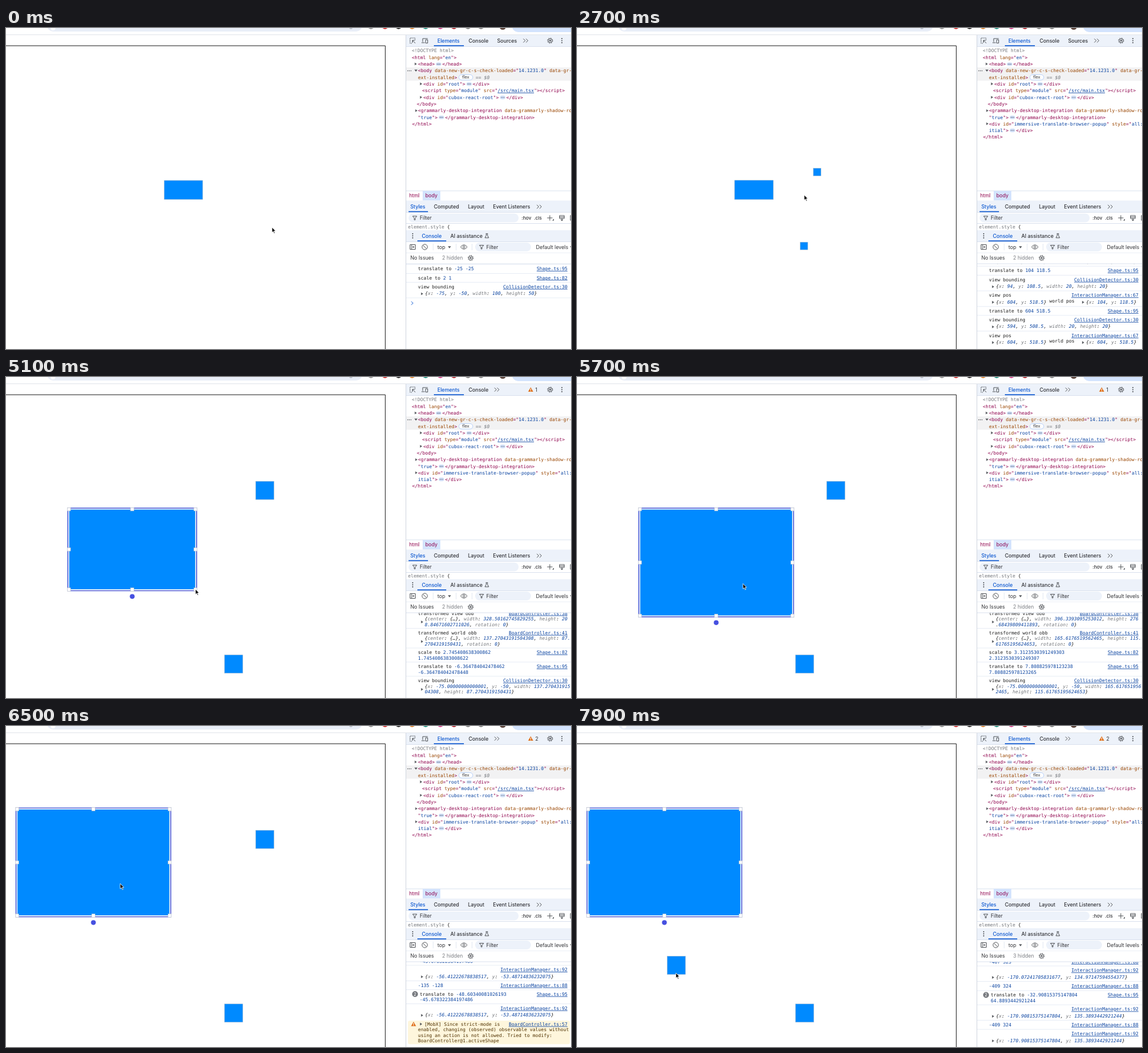
An HTML page that plays this animation: 960 px wide and 546 px high, repeating every 8000 ms.

```html
<!DOCTYPE html>
<html lang="en">
<head>
<meta charset="utf-8">
<title>Canvas board with inspector</title>
<style>
html, body { margin: 0; width: 100%; height: 100%; overflow: hidden; background: #fff; }
svg { display: block; width: 960px; height: 546px; }
text { white-space: pre; }
.u { font: 500 8.6px Inter, Roboto, sans-serif; fill: #303135; }
.r { font-weight: 400; }
.small { font-size: 8px; }
.on { fill: #0b57d0; }
.dim { fill: #7c7f84; }
.m { font: 7.9px "DejaVu Sans Mono", "Liberation Mono", monospace; fill: #1f1f1f; }
.o { font-style: italic; }
.tag { fill: #8e004b; }
.a { fill: #994500; }
.v, .n { fill: #0842a0; }
.l { fill: #0842a0; text-decoration: underline; }
.k { fill: #74777c; }
.w { fill: #4f3200; }
.i { fill: none; stroke: #474a4f; stroke-width: .95; }
.s { fill: #008aff; stroke: #9db6cf; stroke-width: .6; }
</style>
</head>
<body>
<svg id="stage" viewBox="0 0 960 546"></svg>
<script>
const LOOP = 8000, STEP = 100, CHAR = 4.757;
const UNIT = 53.48714836232075 / 128; // world length of one view pixel
const SCALE = [3.3123530391249303, 2.3123530391249307];
const PLACE = [7.808825978123238, 7.808825978123265];

// ---- drawing helpers ----
const esc = s => s.replace(/&/g, '&amp;').replace(/</g, '&lt;').replace(/>/g, '&gt;');
const rect = (x, y, w, h, fill, more = '') =>
  `<rect x="${x}" y="${y}" width="${w}" height="${h}" fill="${fill}" ${more}/>`;
const dot = (x, y, r, fill) => `<circle cx="${x}" cy="${y}" r="${r}" fill="${fill}"/>`;
const icon = (x, y, d, more = '') => `<path class="i" transform="translate(${x} ${y})" d="${d}" ${more}/>`;
const solid = (x, y, d, fill = '#55585d') => `<path transform="translate(${x} ${y})" d="${d}" fill="${fill}"/>`;
const ui = (x, y, s, cls = '') => `<text class="u ${cls}" x="${x}" y="${y + 3.1}">${esc(s)}</text>`;
const mono = (x, y, html, cls = '', more = '') =>
  `<text class="m ${cls}" x="${x}" y="${y + 2.8}" ${more}>${html}</text>`;
const right = (x, y) => solid(x, y, 'M-1.5-2.4 2-0-1.5 2.4z');
const down = (x, y) => solid(x, y, 'M-2.6-1.5H2.6L0 2z');
const more = (x, y) => icon(x, y, 'M-4-3.2-.8 0-4 3.2M.6-3.2 3.8 0 .6 3.2');
const kebab = (x, y) => [-3.4, 0, 3.4].map(d => dot(x, y + d, 1, '#474a4f')).join('');
const gear = (x, y) =>
  `<circle class="i" cx="${x}" cy="${y}" r="3.3"/><circle class="i" cx="${x}" cy="${y}" r="4.5" stroke-dasharray="1.8 1.73"/>` +
  dot(x, y, 1.4, '#474a4f');
const funnel = (x, y) => icon(x, y, 'M-3.6-3H3.6L.8.4V3.4H-.8V.4z');
const alarm = (x, y) => solid(x, y, 'M0-4.1 4.3 3.6H-4.3z', '#e0701c') + rect(x - .5, y - 1.6, 1, 2.8, '#fff') +
  rect(x - .5, y + 1.8, 1, 1, '#fff');

// ---- elements tree; [a name], [v value], [l link] set the colour ----
const MARK = /\[(\w) ([^\]]*)\]/g;
const tree = (x, y, s) => mono(x, y, esc(s).replace(MARK, '<tspan class="$1">$2</tspan>'), 'tag');
function fold(x, y, open, close) {
  const end = x + open.replace(MARK, '$2').length * CHAR;
  const dots = [-2.2, 0, 2.2].map(d => dot(end + 6.5 + d, y + .3, .7, '#45526a')).join('');
  return tree(x, y, open) + rect(end + 2, y - 2.8, 9, 6.2, '#d3e1f8', 'rx="3"') + dots + tree(end + 12.6, y, close);
}

function chrome() {
  const buttons = [[620, '#9a9a9a'], [644, '#d63a3a'], [667, '#333'], [690, '#e08a3a'], [713, '#2b9c8c'],
    [738, '#d84a94'], [761, '#b8343c'], [785, '#8a8a8a'], [807, '#8a8a8a']];
  return rect(0, 0, 960, 546, '#fff') +
    rect(70, -14, 535, 20, '#e9eef8', 'rx="10"') + dot(80, 0, 4, '#fff') + dot(586, -1, 3, '#b8bec8') +
    buttons.map(([x, c]) => dot(x, -3, 5, c)).join('') +
    dot(844, -2.5, 5.5, '#5f4840') + rect(860, -16, 120, 23, '#d3e3fd', 'rx="10"') +
    rect(0, 11, 960, 1, '#e1e4ea') +
    '<path d="M0 30.2H644.4V546" fill="none" stroke="#1a1a1a"/>';
}

function panel() {
  const bar = '#edf2fa', line = '#d9e1ee';
  return rect(680, 12, 280, 19, bar) + rect(680, 31, 280, 1, line) +
    icon(691, 21.5, 'M4-1V-4.5H-4.5V4.5H-1', 'stroke-dasharray="1.6 .9"') +
    icon(691, 21.5, 'M-.5-.5 4.5 4.5M-.5 3.5V-.5H3.5') +
    icon(711.5, 21.5, 'M-3.5 2V-3.5H5M-5.5 3.5H0M1.5-1.5H5V4.2H1.5z') +
    ui(733, 21.7, 'Elements', 'on') + rect(727, 29.4, 51, 1.6, '#0b57d0') +
    ui(786, 21.7, 'Console') + gear(924.5, 21.5) + kebab(944.5, 21.5) +
    // document tree
    rect(680, 67, 280, 22.6, '#f2f2f3') +
    mono(689.5, 38.5, esc('<!DOCTYPE html>'), 'k') +
    tree(689.5, 49.8, '<html [a lang]="[v en]">') +
    right(696, 61.2) + fold(700, 61.2, '<head>', '</head>') +
    [682.7, 685.4, 688.1].map(x => dot(x, 72.8, .8, '#474a4f')).join('') + down(696.5, 72.3) +
    tree(700, 72.5, '<body [a data-new-gr-c-s-check-loaded]="[v 14.1231.0]" [a data-gr-]') +
    tree(700, 83.7, '[a ext-installed]>') +
    rect(769.5, 79.4, 23.5, 9, '#fff', 'rx="4.5" stroke="#a8c7fa" stroke-width=".8"') +
    `<text class="u r" x="775" y="86.3" style="font-size:7px">flex</text>` +
    mono(798, 83.7, '== $0', 'k o') +
    right(705, 95) + fold(709, 95, '<div [a id]="[v root]">', '</div>') +
    tree(707, 106.4, '<script [a type]="[v module]" [a src]="[l /src/main.tsx]"><\/script>') +
    right(705, 117.8) + fold(709, 117.8, '<div [a id]="[v cubox-react-root]">', '</div>') +
    tree(698, 129, '</body>') +
    right(697, 140.6) + tree(700, 140.6, '<grammarly-desktop-integration [a data-grammarly-shadow-ro]') +
    fold(700, 151.7, '"[v true]">', '</grammarly-desktop-integration>') +
    // breadcrumbs and styles
    rect(680, 276.5, 280, 1, line) + rect(708, 277, 30, 16.5, '#d3e3fd') +
    ui(685, 285.2, 'html', 'r tag') + ui(712.5, 285.2, 'body', 'r tag') +
    rect(680, 293.5, 280, 20, bar) + rect(680, 313, 280, 1, line) +
    ui(687, 304, 'Styles', 'on') + rect(684, 311.6, 33, 1.6, '#0b57d0') +
    ui(727, 304, 'Computed') + ui(785, 304, 'Layout') + ui(827.5, 304, 'Event Listeners') + more(906, 304) +
    rect(684, 315.5, 187, 15, bar, 'rx="7.5"') + funnel(694.5, 323) + ui(703, 323, 'Filter', 'r') +
    ui(876, 322.8, ':hov', 'small') + ui(897, 322.8, '.cls', 'small') +
    icon(924, 323, 'M-4.5 0H4.5M0-4.5V4.5') + solid(930, 326.5, 'M1-2V1H-2z') +
    icon(944.5, 323, 'M-4-4H4V1H-4zM-4-1.5H4M-1 1V4.5H1V1') + icon(962, 323, 'M-3-4H4V4H-3z') +
    rect(680, 332, 280, 1, line) +
    mono(683, 338.6, 'element.style <tspan fill="#1f1f1f">{</tspan>', 'k') +
    // drawer
    rect(680, 344, 280, 19.5, bar) + rect(680, 363, 280, 1, line) + kebab(691, 353.5) +
    ui(706.5, 353.7, 'Console', 'on') + rect(699, 361.4, 49, 1.6, '#0b57d0') +
    ui(755, 353.7, 'AI assistance') + icon(817, 353.5, 'M-1.8-3.6H1.8M-1-3.6V-.8L-3.2 3.4H3.2L1-.8V-3.6') +
    icon(691, 372.5, 'M-4.5-4H4.5V4H-4.5zM-1.8-4V4M3 0H.2M1.6-1.6 0 0 1.6 1.6') +
    `<circle class="i" cx="711.5" cy="372.5" r="4.6"/>` + icon(711.5, 372.5, 'M-3.2-3.2 3.2 3.2') +
    [725.5, 764.5, 791.5].map(x => rect(x, 367, .8, 11, line)).join('') +
    ui(733, 372.7, 'top', 'r') + down(753.5, 372.8) +
    icon(778, 372.5, 'M-5.6 0Q0-7.4 5.6 0 0 7.4-5.6 0z') + `<circle class="i" cx="778" cy="372.5" r="1.7"/>` +
    rect(797, 365, 95, 15, bar, 'rx="7.5"') + funnel(808, 372.5) + ui(816, 372.7, 'Filter', 'r') +
    ui(900.5, 372.7, 'Default levels', 'r') + down(961, 372.8) +
    rect(680, 382, 280, .8, '#e8edf5') + ui(687, 391.3, 'No Issues', 'r') + gear(789.5, 391.2) +
    rect(680, 400.5, 280, 1, line) + rect(679, 12, 1, 534, '#cfd5df');
}

// ---- console ----
const paint = s => s.replace(/([a-z]+)(?=:)|(-?\d[\d.]*)/g,
  (m, key) => `<tspan class="${key ? 'k' : 'n'}">${m}</tspan>`);
const obj = (x, y, s) => right(x - 5.2, y + .8) + mono(x, y, paint(s), 'o');
const link = (y, s) => mono(954, y, s, 'l', 'text-anchor="end"');
const row = (y, text, src, x = 700) => rect(680, y - 7.8, 280, .8, '#e2e8f3') +
  text.split('\n').map((s, i) => mono(x, y + i * 9.6, paint(s))).join('') + link(y, src);
const SHAPE = 'Shape.ts:', BOARD = 'BoardController.ts:', HAND = 'InteractionManager.ts:', HIT = 'CollisionDetector.ts:30';
const pt = (x, y) => `{x: ${x}, y: ${y}}`;
const area = (x, y, w, h) => `{x: ${x}, y: ${y}, width: ${w}, height: ${h}}`;

const moved = (y, a, b) => row(y, `translate to ${a} ${b}`, SHAPE + 95);
const bounds = (y, s) => row(y, 'view bounding', HIT) + obj(712, y + 11.3, s);
const points = (y, a, b) => obj(712, y, a) + mono(802.6, y - 1.8, 'world pos') + obj(865, y, b);
const pos = (y, a, b) => row(y, 'view pos', HAND + 67) + points(y + 11.2, a, b);
const wrapped = (y, text, src, s, col) => row(y, text, src) + right(706.8, y + 14.9) +
  mono(711.5, y + 9.5, paint(s.slice(0, col)), 'o') + mono(711.5, y + 18.9, paint(s.slice(col)), 'o');

function warning() {
  const rest = ['enabled, changing (observed) observable values without',
    'using an action is not allowed. Tried to modify:', 'BoardController@1.activeShape'];
  return rect(683, 501.3, 275, 40, '#fef6dc', 'rx="3"') + alarm(692.5, 507) + right(705, 507) +
    mono(711, 507, '[MobX] Since strict-mode is', 'w') +
    rest.map((s, i) => mono(700, 516.6 + i * 9.4, s, 'w')).join('') + link(507, BOARD + 57);
}

const first = () => moved(409.5, -25, -25) + row(424.8, 'scale to 2 1', SHAPE + 82) +
  bounds(440, area(-75, -50, 100, 50)) + rect(680, 458.6, 280, .8, '#e2e8f3') +
  icon(690, 468, 'M-1.5-2.8 1.7 0-1.5 2.8', 'style="stroke:#0b57d0"');

function added(wx, wy) {
  const vx = wx + 500, vy = wy + 400, w = pt(wx, wy), v = pt(vx, vy);
  return points(397.6, v, v) + moved(412.5, wx, wy) + bounds(428, area(wx - 10, wy - 10, 20, 20)) + pos(454.5, v, w) +
    moved(481.2, vx, vy) + bounds(496.2, area(vx - 10, vy - 10, 20, 20)) + pos(523, v, v);
}

const picked = () => {
  const v = pt(604, 518.5);
  return pos(411.8, v, pt(104, 118.5)) + moved(438.5, 604, 518.5) +
    bounds(453.7, area(594, 508.5, 20, 20)) + pos(480.4, v, v) + warning();
};

function resized(u) {
  const [sx, sy] = shift([2, 1], SCALE, u), at = shift([-25, -25], PLACE, u);
  const w = 50 * sx, h = 50 * sy;
  const obb = (a, b) => `{center: {…}, width: ${a}, height: ${b}, rotation: 0}`;
  return wrapped(401.8, 'transformed view obb', BOARD + 38, obb(w / UNIT, h / UNIT), 51) +
    wrapped(435, 'transformed world obb', BOARD + 41, obb(w, h), 52) +
    row(468.4, `scale to ${sx}\n${sy}`, SHAPE + 82) +
    row(492.3, `translate to ${at[0]}\n${at[1]}`, SHAPE + 95) +
    wrapped(516.4, 'view bounding', HIT, area(-75.00000000000001, -50, w, h), 52);
}

const delta = (y, x, z) => row(y, `${x} ${z}`, HAND + 88);
const world = (y, x, z) => row(y, '', HAND + 92) + obj(712, y + 11.4, pt(x * UNIT, z * UNIT));
const twice = (y, x, z) => row(y, `translate to ${x}\n${z}`, SHAPE + 95, 703) + dot(695, y, 4.9, '#75787d') +
  `<text x="695" y="${y + 2.5}" text-anchor="middle" fill="#fff" style="font:500 7px Inter,sans-serif">2</text>`;

function dragged(x, z, [ox, oz]) {
  return delta(401, x + 2, z - 1) + world(415.5, x + 2, z - 1) + delta(442, x, z) +
    twice(457.5, ox + x * UNIT, oz + z * UNIT) + world(481.6, x, z) + delta(508, x, z) + world(523.4, x, z);
}

function dropped(x, z, [ox, oz]) {
  const px = ox + x * UNIT, pz = oz + z * UNIT;
  return mono(703, 399.9, paint(String(pz))) + world(414.4, x, z) + delta(441, x, z) +
    twice(456, px, pz) + world(480, x, z) + warning();
}

// ---- motion ----
const ZOOM_IN = [2670, 3300], RESIZE = [4800, 5350], DRAG = [5800, 6300], PULL = [7150, 7850];
const smooth = u => u * u * (3 - 2 * u);
const part = (t, [a, b]) => smooth(Math.min(1, Math.max(0, (t - a) / (b - a))));
const shift = (from, to, u) => u === 1 ? to : from.map((v, i) => v + (to[i] - v) * u);
function track(keys, t) {
  const i = keys.findIndex(k => k[0] > t);
  if (i < 0) return keys[keys.length - 1].slice(1);
  const a = keys[i - 1], b = keys[i];
  return shift(a.slice(1), b.slice(1), part(t, [a[0], b[0]]));
}

const POINTER = [[0, 452, 339], [900, 408, 245], [1050, 408, 245], [1500, 434, 324], [1850, 386, 370],
  [2000, 386, 370], [2200, 365, 330], [2500, 386, 284], [3300, 386, 284], [3750, 183, 267], [4250, 183, 267],
  [4700, 264, 303], [4800, 264, 303], [5350, 366, 405], [5650, 282, 351.5], [5800, 282, 351.5], [6300, 194, 268],
  [6550, 194, 268], [7100, 439, 206], [7150, 439, 206], [7850, 168, 420]];

function selection(x, y, w, h) {
  const outline = (gap, color, width) =>
    rect(x - gap, y - gap, w + 2 * gap, h + 2 * gap, 'none', `stroke="${color}" stroke-width="${width}"`);
  let out = outline(1.9, '#3f51d4', 1.6) + outline(.4, '#fff', 1.4);
  for (const i of [0, .5, 1]) for (const j of [0, .5, 1])
    if (i !== .5 || j !== .5)
      out += rect(x + w * i - 2.8, y + h * j - 2.8, 5.6, 5.6, '#fff', 'stroke="#b9bec6" stroke-width=".6"');
  return out + dot(x + w / 2, y + h + 11.8, 4.1, '#4650e0');
}

function board(t) {
  const z = part(t, ZOOM_IN), r = part(t, RESIZE), d = part(t, DRAG), p = part(t, PULL);
  let [x, y, w, h] = shift([268.9, 259.2, 65.2, 32.5], [107, 225, 157, 78], z);
  x -= 88 * d; y -= 83.5 * d; w += 102 * r; h += 103 * r;
  const [ax, ay, as] = shift([401.5, 239, 12.8], [424.2, 177.4, 31], z);
  const [bx, by, bs] = shift([379.2, 363.5, 12.8], [371.2, 472.8, 31], z);
  const shape = (x, y, w, h) => `<rect class="s" x="${x}" y="${y}" width="${w}" height="${h}"/>`;
  let out = shape(x, y, w, h);
  if (t >= 1000) out += shape(ax - 271 * p, ay + 214.2 * p, as, as);
  if (t >= 1900) out += shape(bx, by, bs, bs);
  if (t >= 3800) out += selection(x, y, w, h);
  const [cx, cy] = track(POINTER, t);
  return out + `<path transform="translate(${cx} ${cy})" fill="#000" stroke="#fff" stroke-width=".8"
    d="M0 0V8.8L2 7 3.6 10.4 5 9.8 3.4 6.5H6.2z"/>`;
}

function consoleAt(t) {
  if (t < 1000) return first();
  if (t < 1900) return added(138, -70.5);
  if (t < 3800) return added(104, 118.5);
  if (t <= RESIZE[0]) return picked();
  if (t <= DRAG[0]) return resized(part(t, RESIZE));
  const d = part(t, DRAG), p = part(t, PULL);
  if (t < 6400) return dragged(Math.round(-135 * d), Math.round(-128 * d), PLACE);
  if (t <= PULL[0]) return dropped(-135, -128, PLACE);
  return dragged(Math.round(-409 * p), Math.round(324 * p), [138, -70.5]);
}

function status(t) {
  const tabs = t >= 3800 ? more(834, 21.5) + alarm(891.5, 21.5) + ui(899.2, 21.7, t < 6400 ? '1' : '2', 'r')
    : ui(834.5, 21.7, 'Sources') + more(883, 21.5);
  return tabs + ui(741, 391.3, `${t > PULL[0] ? 3 : 2} hidden`, 'r dim');
}

function popup(t) {
  if (t < 1400) return tree(690, 162.7, '</html>');
  return right(697, 162.8) +
    tree(700, 162.8, '<div [a id]="[v immersive-translate-browser-popup]" [a style]="[v all:]') +
    fold(700, 173.8, '[v itial]">', '</div>') + tree(690, 185, '</html>');
}

function flash(t) {
  const a = t < 1400 ? 0 : Math.max(0, 1 - (t - 1400) / 1100);
  const box = (x, y, w) => rect(x, y, w, 9.4, '#786a72', `opacity="${a}" rx="1"`);
  return a ? box(704.8, 56.6, 19.4) + box(704.8, 158.2, 14.4) : '';
}

const stage = document.getElementById('stage');
stage.innerHTML = '<clipPath id="log"><path d="M680 401.5H960V546H680z"/></clipPath>' + chrome() +
  '<g id="board"></g>' + panel() +
  '<g id="flash" style="mix-blend-mode:multiply"></g><g id="popup"></g><g id="status"></g><g id="console" clip-path="url(#log)"></g>';

const parts = Object.entries({ board, flash, popup, status, console: consoleAt })
  .map(([id, draw]) => ({ el: document.getElementById(id), draw, last: null }));
const start = performance.now();

function frame() {
  const t = Math.floor(((performance.now() - start) % LOOP) / STEP) * STEP;
  for (const p of parts) {
    const html = p.draw(t);
    if (html !== p.last) p.el.innerHTML = p.last = html;
  }
  requestAnimationFrame(frame);
}
frame();
</script>
</body>
</html>
```
